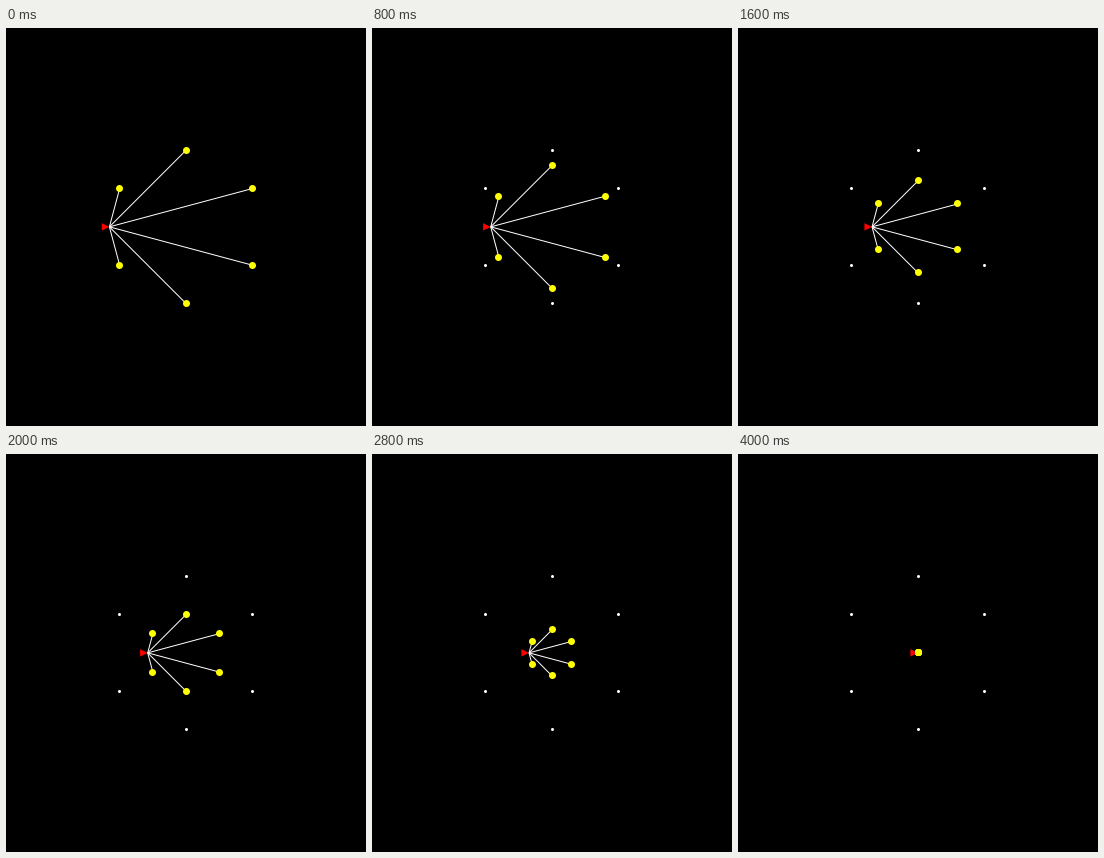
A matplotlib script for the animation above (4100 ms loop, 360 by 398 pixels).

```python
import numpy as np
import matplotlib.pyplot as plt
from matplotlib.animation import FuncAnimation
from matplotlib.patches import Circle, Polygon

W, H, DPI = 360, 398, 100
PX = 72 / DPI                 # one pixel in points
FRAMES, INTERVAL = 41, 100
CX, CY, RADIUS = 180, 198.86, 76.6
HEAD_LENGTH, HEAD_HALF = 7.6, 3.7
ANGLES = np.radians(np.arange(30, 390, 60))

fig = plt.figure(figsize=(W / DPI, H / DPI), dpi=DPI, facecolor="black")
ax = fig.add_axes([0, 0, 1, 1])
ax.set_xlim(0, W)
ax.set_ylim(H, 0)
ax.axis("off")


def ring(radius):
    """Six points around the centre, y pointing down."""
    return [(CX + radius * np.cos(a), CY - radius * np.sin(a)) for a in ANGLES]


def cell(point):
    """Middle of the pixel that holds the point."""
    return tuple(np.floor(np.array(point) + 1e-6) + 0.5)


def dot(point, radius, color, z):
    patch = Circle(cell(point), radius, fc=color, lw=0, zorder=z)
    patch.set_snap(False)
    return ax.add_patch(patch)


for p in ring(RADIUS):
    dot(p, 1.5, "white", 1)

arrow = ax.add_patch(Polygon([(0, 0)] * 3, fc="red", lw=0, zorder=2))
arrow.set_snap(False)
spokes = [ax.plot([], [], color="white", lw=PX, snap=False, zorder=3,
                  solid_capstyle="butt")[0] for _ in ANGLES]
beads = [dot(p, 3.5, "yellow", 4) for p in ring(RADIUS)]


def update(i):
    radius = RADIUS * (1 - i / (FRAMES - 1))
    tip = CX - radius
    back = tip - HEAD_LENGTH
    arrow.set_xy([(back, CY - HEAD_HALF), (back, CY + HEAD_HALF), (tip, CY)])
    for spoke, bead, (x, y) in zip(spokes, beads, ring(radius)):
        spoke.set_data([tip, x], [CY, y])
        bead.center = cell((x, y))
    return [arrow, *spokes, *beads]


anim = FuncAnimation(fig, update, frames=FRAMES, interval=INTERVAL,
                     repeat=True, repeat_delay=0, blit=False)
plt.show()
```
